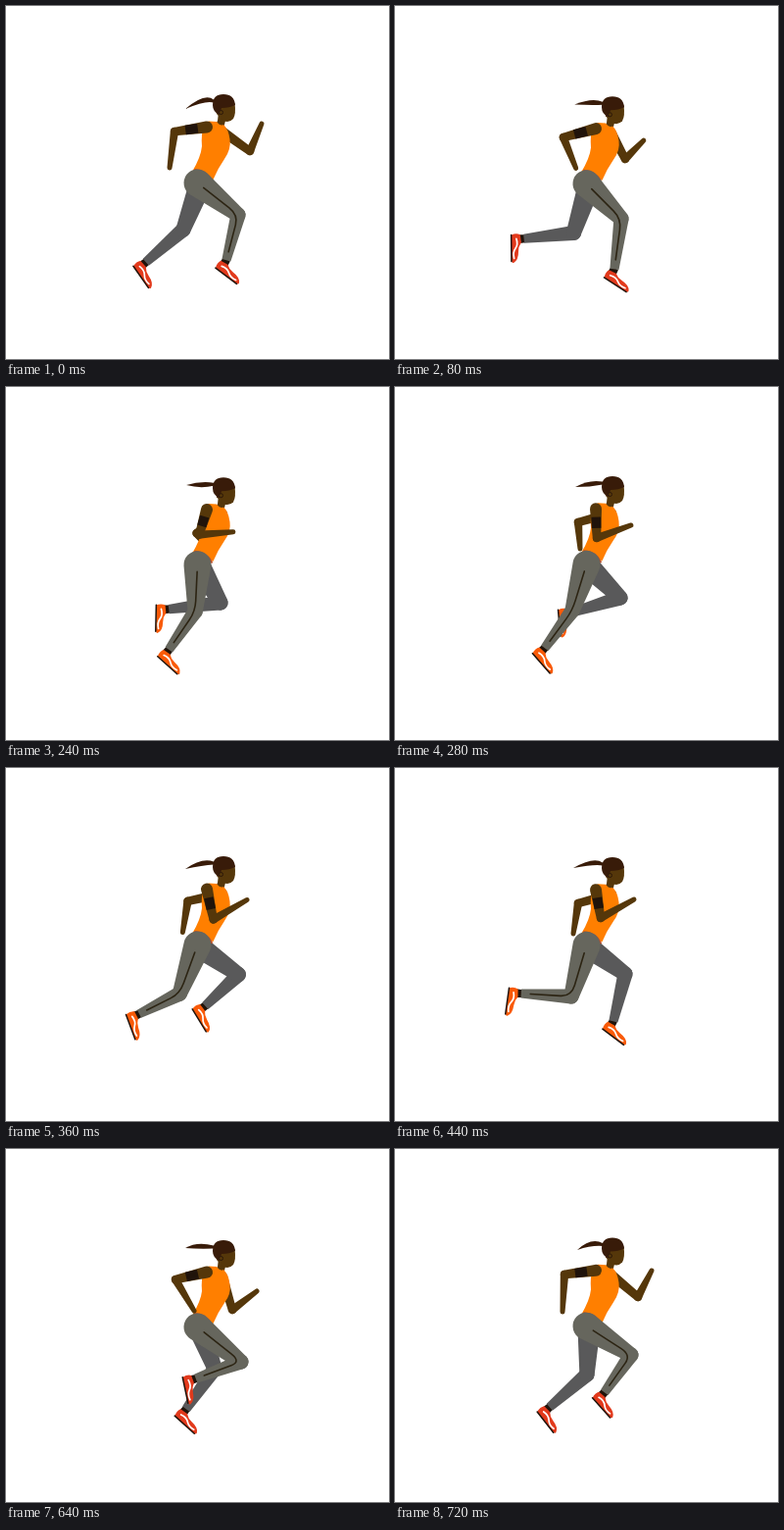
Recreate the animation shown at these times as an HTML page. Size 391 by 360 pixels, loop 760 ms.

```html
<!DOCTYPE html>
<html lang="en">
<head>
<meta charset="utf-8">
<title>Runner</title>
<style>
html, body { margin: 0; width: 100%; height: 100%; overflow: hidden; background: #fff; }
svg { display: block; width: 100vw; height: 100vh; }
</style>
</head>
<body>
<svg id="stage" viewBox="0 0 391 360"></svg>
<script>
const STEP = 40, COUNT = 19;
const SKIN = '#55370a', HAIR = '#381b09', DARK = '#20130a';
const SHIRT = '#ff7f00', NEAR = '#66665d', FAR = '#59595a';

// Rows: step, then the values at that step
const LEG_NEAR = [ // knee x, y, ankle x, y, foot angle
  [0, 237, 213, 225, 259, 37],
  [2, 231, 217, 224, 268, 33],
  [4, 219, 229, 195, 269, 30],
  [7, 181, 228, 153, 266, 49],
  [8, 178, 229, 143, 261, 55],
  [11, 180, 233, 129, 230, 98],
  [13, 201, 239, 153, 224, 98],
  [16, 240, 217, 194, 234, 78],
  [18, 241, 210, 214, 248, 48]
];
const LEG_FAR = [
  [0, 181, 228, 143, 261, 55],
  [2.5, 184, 232, 131, 232, 96],
  [4, 193, 231, 140, 224, 97],
  [7, 230, 215, 180, 230, 85],
  [9.5, 238, 210, 209, 246, 52],
  [11, 235, 210, 223, 258, 37],
  [13, 230, 217, 225, 268, 34],
  [14.5, 223, 226, 206, 270, 30],
  [16, 213, 224, 184, 265, 42],
  [18, 196, 230, 158, 263, 52]
];
const ARM_NEAR = [ // elbow x, y, hand x, y
  [0, 172, 128, 167, 165],
  [4, 176, 141, 206, 163],
  [7, 206, 154, 241, 141],
  [11, 210, 153, 244, 134],
  [13, 191, 153, 230, 152],
  [16, 173, 133, 192, 165],
  [18, 173, 128, 171, 166]
];
const ARM_FAR = [
  [0, 249, 148, 261, 120],
  [4, 218, 163, 243, 156],
  [5.5, 200, 155, 220, 166],
  [7, 187, 138, 189, 165],
  [11, 187, 138, 182, 169],
  [13, 190, 146, 209, 162],
  [14.5, 212, 162, 236, 163],
  [16, 231, 164, 256, 145],
  [18, 248, 151, 262, 124]
];
const BODY = [ // head drop, hair middle x, y, tip x, y
  [0, 0, 203, 91, 183, 105],
  [4, 4, 199, 101, 184, 97],
  [7, 1, 198, 97, 184, 102],
  [9, 0, 200, 94, 183, 103],
  [11, 1, 203, 93, 182, 102],
  [13, 3, 199, 101, 184, 98],
  [16, 3, 195, 97, 183, 101],
  [18, 0.5, 200, 93, 186, 103]
];

// Smooth closed curve through unevenly spaced rows
function sample(rows, t) {
  const n = rows.length;
  const row = i => rows[(i + n) % n];
  const time = i => row(i)[0] + COUNT * Math.floor(i / n);
  let i = n - 1;
  while (rows[i][0] > t) i--;
  const t0 = time(i), span = time(i + 1) - t0, u = (t - t0) / span;
  const slope = (j, k) => (row(j + 1)[k] - row(j - 1)[k]) / (time(j + 1) - time(j - 1)) * span;
  return row(i).slice(1).map((a, c) => {
    const k = c + 1, b = row(i + 1)[k], m = slope(i, k), q = slope(i + 1, k);
    const d = b - a;
    return a + u * (m + u * (3 * d - 2 * m - q + u * (m + q - 2 * d)));
  });
}

const f = v => v.toFixed(2);
const pt = p => f(p[0]) + ' ' + f(p[1]);
const mix = (a, b, u) => [a[0] + (b[0] - a[0]) * u, a[1] + (b[1] - a[1]) * u];
const fill = (d, color) => `<path d="${d}" fill="${color}"/>`;
const line = (d, color, w, cap = 'round') =>
  `<path d="${d}" fill="none" stroke="${color}" stroke-width="${w}" stroke-linecap="${cap}"/>`;

// Tapered limb between two circles, optionally cut flat at the far end
function limb(a, ra, b, rb, color, flat) {
  const dir = Math.atan2(b[1] - a[1], b[0] - a[0]);
  const len = Math.hypot(b[0] - a[0], b[1] - a[1]);
  const k = Math.acos(Math.max(-1, Math.min(1, (ra - rb) / len)));
  const on = (c, r, ang) => pt([c[0] + r * Math.cos(ang), c[1] + r * Math.sin(ang)]);
  const end = flat ? 'L' : `A${rb} ${rb} 0 0 1 `;
  return fill(`M${on(a, ra, dir - k)}L${on(b, rb, dir - k)}${end}${on(b, rb, dir + k)}` +
    `L${on(a, ra, dir + k)}A${ra} ${ra} 0 1 1 ${on(a, ra, dir - k)}Z`, color);
}

function shoe(ankle, angle, color) {
  return `<g transform="translate(${pt(ankle)}) rotate(${f(angle)})">` +
    fill('M-4 -1L4 -1L5 6L-4 6Z', DARK) +
    fill('M-4 4L4 3Q8 6 13 6Q22 6 24.5 11Q25 13 22 13L-4 13Q-6 8 -4 4Z', color) +
    line('M-4 13.2H23', DARK, 1.5) +
    line('M0 8Q6 6 10 9T20 10.5', '#fff', 1.7) + '</g>';
}

function leg(rows, t, hip, r, color, shoeColor, stripe) {
  const [kx, ky, ax, ay, angle] = sample(rows, t);
  const knee = [kx, ky], ankle = [ax, ay];
  let out = shoe(ankle, angle, shoeColor) +
    limb(knee, 7.6, ankle, 4.6, color, true) +
    limb(hip, r, knee, 7.6, color);
  if (stripe) {
    out += line(`M${pt(mix(hip, knee, 0.15))}L${pt(mix(hip, knee, 0.78))}` +
      `Q${pt(knee)} ${pt(mix(knee, ankle, 0.22))}L${pt(mix(knee, ankle, 0.82))}`, '#2c2413', 1.6);
  }
  return out;
}

function arm(rows, t, shoulder, r, band) {
  const [ex, ey, hx, hy] = sample(rows, t);
  const elbow = [ex, ey], hand = [hx, hy];
  let out = limb(shoulder, r, elbow, 4.2, SKIN) + limb(elbow, 4.2, hand, 2.5, SKIN);
  if (band) {
    out += line(`M${pt(mix(shoulder, elbow, 0.28))}L${pt(mix(shoulder, elbow, 0.66))}`, DARK, 9.5, 'butt');
  }
  return out;
}

function head(drop, mx, my, tx, ty) {
  const base = [212, 97 + drop], tip = [tx, ty];
  const tail = `M${pt([base[0], base[1] - 1.5])}Q${pt([mx, my - 3])} ${pt(tip)}` +
    `Q${pt([mx + 1, my + 5])} ${pt([base[0], base[1] + 1.5])}Z`;
  return fill(tail, HAIR) + `<g transform="translate(0 ${f(drop)})">` +
    fill('M217 108L216 117L214 121L222 125L224 117Z', SKIN) +
    fill('M214 101L233.500 99Q235 110 232 115Q228 119.500 222 117L215 110Z', SKIN) +
    fill('M218 111Q211 108 211 101Q211 90 222 90Q233 90 234 101Q228 104 220 104Z', HAIR) +
    '<circle cx="219.500" cy="108.500" r="2" fill="#55370a" stroke="#2c1808" stroke-width="1"/></g>';
}

function torso(top, low) {
  const y = (v, d) => f(v + d);
  return fill(`M207 ${y(117.5, top)}L215 ${y(118, top)}Q219 ${y(123, top)} 222 ${y(121, top)}` +
    `Q227 ${y(125, top)} 228.500 ${y(136, top)}Q230 ${y(146, top)} 223 ${y(156, low)}` +
    `Q216 ${y(166, low)} 211.500 ${y(177, low)}L190 ${y(169, low)}` +
    `Q199 ${y(154, low)} 200 ${y(143, top)}Q199 ${y(130, top)} 202 ${y(122, top)}Z`, SHIRT);
}

function pose(i) {
  const [drop, mx, my, tx, ty] = sample(BODY, i);
  const top = drop * 0.7, low = drop * 0.35;
  const red = i > 5 && i < 12 ? '#f95a08' : '#e23a1c';
  return arm(ARM_FAR, i, [221, 128 + top], 5) +
    leg(LEG_FAR, i, [198, 183 + low], 11.5, FAR, red) +
    head(drop, mx, my, tx, ty) +
    torso(top, low) +
    line(`M193 ${f(167 + low)}Q205 ${f(168 + low)} 210 ${f(178 + low)}`, '#b9502c', 2) +
    leg(LEG_NEAR, i, [195.5, 180.5 + low], 14, NEAR, red, true) +
    arm(ARM_NEAR, i, [205, 123.5 + top], 6, true);
}

const stage = document.getElementById('stage');
const start = performance.now();
let shown = -1;

function draw() {
  const i = Math.floor((performance.now() - start) / STEP) % COUNT;
  if (i !== shown) stage.innerHTML = pose(shown = i);
  requestAnimationFrame(draw);
}
draw();
</script>
</body>
</html>
```
